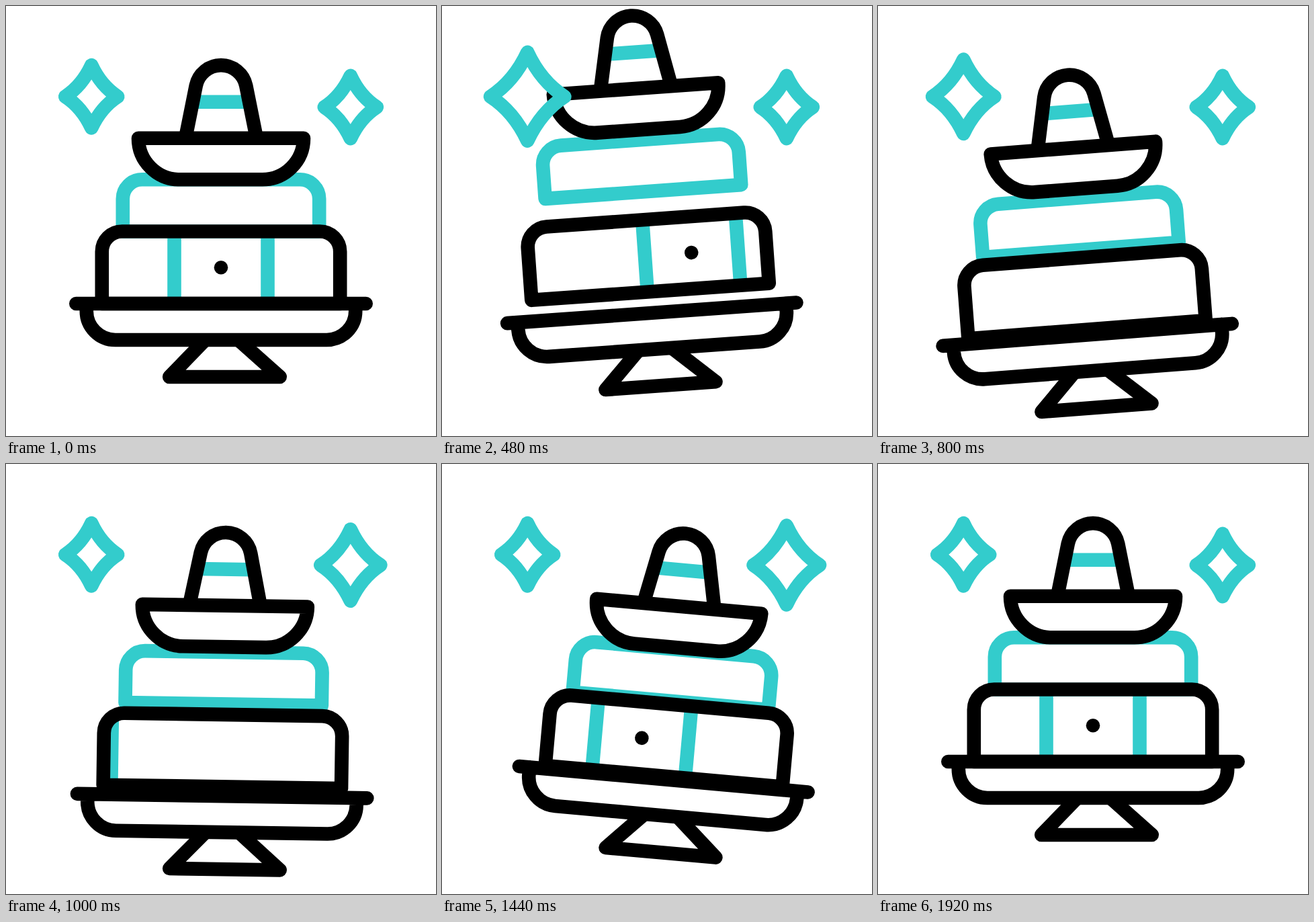
Write an HTML page that moves like this. It is 640 by 640 pixels and loops after 2 s.

```html
<!DOCTYPE html>
<html lang="en">
<head>
<meta charset="utf-8">
<title>Bouncing cake</title>
<style>
  html, body { margin: 0; width: 100%; height: 100%; overflow: hidden; background: #fff; }
  svg { display: block; width: 100%; height: 100%; }
  .line { fill: none; stroke: #000; stroke-width: 20.6; stroke-linecap: round; stroke-linejoin: round; }
  .teal { stroke: #33cccc; }
  .butt { stroke-linecap: butt; }
</style>
</head>
<body>
<svg viewBox="0 0 640 640">
  <defs>
    <path id="tierShape" d="M142.8 443V365.5a30 30 0 0 1 30-30H467.2a30 30 0 0 1 30 30V443Z"/>
    <path id="star" d="M0-46.6Q14.2-16 39 0Q14.2 16 0 46.6Q-14.2 16-39 0Q-14.2-16 0-46.6Z"/>
    <clipPath id="tierClip"><use href="#tierShape"/></clipPath>
  </defs>

  <g id="cake">
    <g id="upper">
      <path class="line teal" d="M173.8 335.7V287a28.7 28.7 0 0 1 28.7-28.7H437.5a28.7 28.7 0 0 1 28.7 28.7V335.7Z"/>
    </g>
    <g id="hat">
      <path class="line teal butt" d="M280 142.7H360"/>
      <path class="line" d="M267.8 193L282.8 118.4a38 38 0 0 1 74.4 0L372.2 193"/>
      <path class="line" d="M197 196.8H443a61.5 61.5 0 0 1-61.5 61.5H258.5a61.5 61.5 0 0 1-61.5-61.5Z"/>
    </g>
    <g id="lower">
      <g clip-path="url(#tierClip)">
        <g id="decor">
          <path class="line teal butt" d="M250.5 335V443M389.5 335V443"/>
          <circle cx="320" cy="389.3" r="10.3"/>
        </g>
      </g>
      <use class="line" href="#tierShape"/>
    </g>
    <path class="line" d="M296 497.5L243.2 552H407.7L346.5 497.5"/>
    <path class="line" d="M104.3 443H535.7M119.8 443V454a43 43 0 0 0 43 43H477.2a43 43 0 0 0 43-43V443"/>
  </g>

  <use id="starLeft" class="line teal" href="#star"/>
  <use id="starRight" class="line teal" href="#star"/>
</svg>
<script>
  const LOOP = 2000, REST = 1920, STEP = 40, STROKE = 20.6;
  const PIVOT = '325.5 552', MAX_TILT = 6, MAX_DROP = 51.2;
  const HALF_HOP = 280, HALF_HOPS = 6;

  // Bottom to top; sag is the share of a hop's height kept when it lands.
  const tiers = [
    { id: 'lower', start: 130, height: 36.7, decay: 0.385, sag: 0.12 },
    { id: 'upper', start: 210, height: 42, decay: 0.385, sag: 0.28 },
    { id: 'hat', start: 345, height: 31.8, decay: 0.5, sag: 0.15 }
  ];

  const part = id => document.getElementById(id);
  const place = (id, transform) => part(id).setAttribute('transform', transform);

  function ease(t, from, to) {
    const s = Math.min(1, Math.max(0, (t - from) / (to - from)));
    return s * s * (3 - 2 * s);
  }

  // Height at the k-th turning point: odd ones are peaks, even ones landings.
  function turn({ height, decay, sag }, k) {
    if (k <= 0 || k >= HALF_HOPS) return 0;
    const peak = height * decay ** Math.floor((k - 1) / 2);
    return k % 2 ? peak : peak * sag;
  }

  function hop(tier, t) {
    const n = (t - tier.start) / HALF_HOP, k = Math.floor(n);
    const a = turn(tier, k), b = turn(tier, k + 1);
    return n < 0 ? 0 : a + (b - a) * ease(n, k, k + 1);
  }

  const tilt = t => MAX_TILT * (2 * ease(t, 655, 1285) - ease(t, 193, 655) - ease(t, 1285, 1925));
  const drop = t => MAX_DROP * (ease(t, 251, 941) - ease(t, 1156, 1734));
  const pulse = (t, start) => 1 + 0.5 * (ease(t, start, start + 410) - ease(t, start + 410, start + 770));

  // The decoration leaves on the right and comes back in from the left.
  function spin(t) {
    if (t < 186 || t > 1768) return 0;
    return t < 966 ? 155.5 * ((t - 186) / 454) ** 2 : -235 * ((1768 - t) / 768) ** 2.15;
  }

  function drawStar(id, x, y, size) {
    place(id, `translate(${x} ${y}) scale(${size})`);
    part(id).style.strokeWidth = STROKE / size;
  }

  function draw(t) {
    place('cake', `translate(0 ${drop(t)}) rotate(${tilt(t)} ${PIVOT})`);

    // Each tier rides on the one below it.
    let lift = 0;
    for (const tier of tiers) {
      lift += hop(tier, t);
      place(tier.id, `translate(0 ${-lift})`);
    }
    place('decor', `translate(${spin(t)} 0)`);
    drawStar('starLeft', 127.2, 134.8, pulse(t, 178));
    drawStar('starRight', 512.8, 150.5, pulse(t, 856));
  }

  const start = performance.now();
  function tick() {
    const t = Math.floor((performance.now() - start) % LOOP / STEP) * STEP;
    draw(t < REST ? t : 0);
    requestAnimationFrame(tick);
  }
  tick();
</script>
</body>
</html>
```
